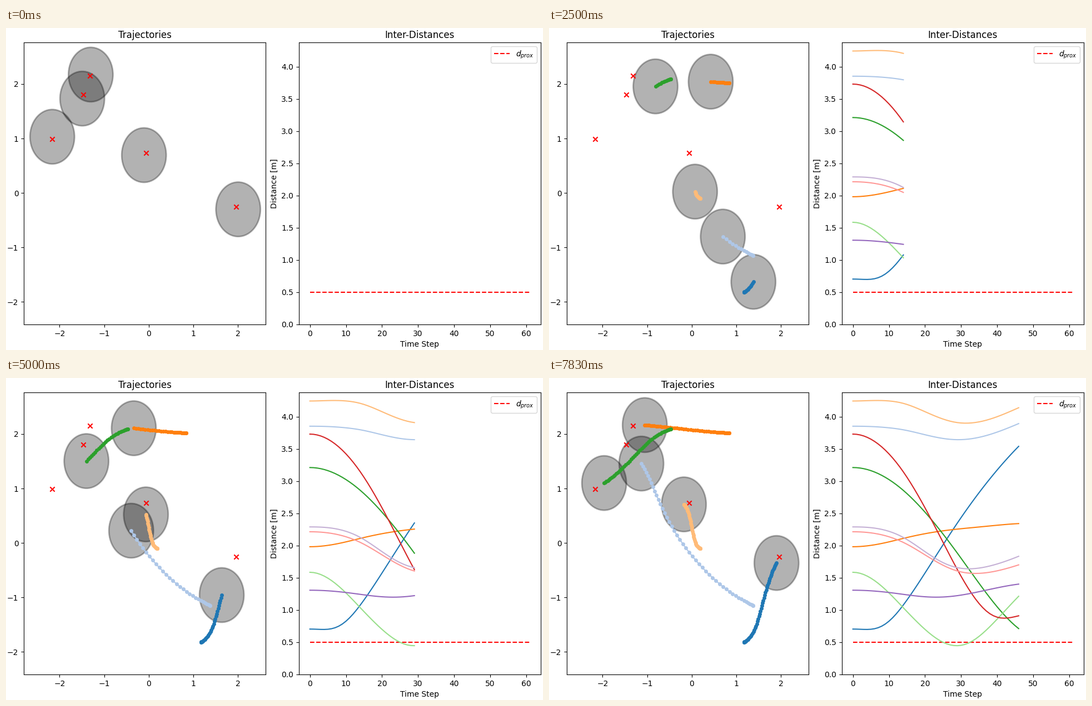
Write a matplotlib script that moves like this. It is 966 px wide and 580 px high and loops after 8000 ms.

```python
from itertools import combinations

import matplotlib.pyplot as plt
import numpy as np
from matplotlib.animation import FuncAnimation

W, H, DPI = 966, 580, 100
LOOP, TICK = 8000, 50
SHOWN = 48  # time steps shown per loop
LAST = 61
RADIUS = PROX = 0.5

# Each agent's start, three waypoints and end, reached at these time steps.
KNOTS = np.array([0, 14, 29, 46, LAST])
PATHS = [
    [(1.174, -1.820), (1.386, -1.631), (1.640, -0.956), (1.905, -0.367), (2.010, -0.300)],
    [(1.380, -1.147), (0.699, -0.800), (-0.393, 0.226), (-1.130, 1.458), (-1.492, 1.733)],
    [(0.838, 2.019), (0.427, 2.044), (-0.335, 2.107), (-1.054, 2.165), (-1.302, 2.174)],
    [(0.190, -0.099), (0.075, 0.025), (-0.062, 0.525), (-0.175, 0.709), (-0.106, 0.695)],
    [(-0.467, 2.095), (-0.813, 1.957), (-1.399, 1.504), (-1.967, 1.101), (-2.166, 1.033)],
]
GOALS = [(1.97, -0.25), (-1.47, 1.804), (-1.32, 2.151), (-0.06, 0.734), (-2.17, 0.989)]


def spline(t, p, ts):
    """Cubic spline through p at times t, at rest at both ends."""
    n = len(t)
    h = np.diff(t)[:, None].astype(float)
    rise = np.diff(p, axis=0) / h
    a, b = np.eye(n), np.zeros_like(p)
    for i in range(1, n - 1):
        h0, h1 = h[i - 1, 0], h[i, 0]
        a[i, i - 1:i + 2] = h1, 2 * (h0 + h1), h0
        b[i] = 3 * (h1 * rise[i - 1] + h0 * rise[i])
    v = np.linalg.solve(a, b)
    k = np.clip(np.searchsorted(t, ts, side="right") - 1, 0, n - 2)
    s = (ts - t[k])[:, None] / h[k]
    return (p[k] * (1 + 2 * s) * (1 - s) ** 2
            + p[k + 1] * s ** 2 * (3 - 2 * s)
            + h[k] * s * (1 - s) * (v[k] * (1 - s) - v[k + 1] * s))


def add_axes(left, title):
    width, top, bottom = 435, 25.9, 533.9
    ax = fig.add_axes([left / W, 1 - bottom / H, width / W, (bottom - top) / H])
    ax.set_title(title)
    return ax


steps = np.arange(LAST + 1)
tracks = [spline(KNOTS, np.array(p), steps) for p in PATHS]
gaps = [np.linalg.norm(p - q, axis=1) for p, q in combinations(tracks, 2)]
colors = plt.get_cmap("tab20").colors

fig = plt.figure(figsize=(W / DPI, H / DPI), dpi=DPI)

ax = add_axes(32.1, "Trajectories")
ax.set(xlim=(-2.804, 2.627), ylim=(-2.413, 2.765))
discs = [ax.add_patch(plt.Circle(p[-1], RADIUS, color="black", alpha=0.3, lw=2))
         for p in tracks]
ax.scatter(*zip(*GOALS), marker="x", color="red")
trails = [ax.plot([], [], "o-", ms=4, color=c)[0] for c in colors[:len(tracks)]]

ax = add_axes(526.9, "Inter-Distances")
ax.set(xlim=(-3.05, 64.05), ylim=(0, 4.379),
       xlabel="Time Step", ylabel="Distance [m]")
ax.plot([0, LAST], [PROX, PROX], "r--", label="$d_{prox}$")
curves = [ax.plot([], [], color=c)[0] for c in colors[:len(gaps)]]
ax.legend(loc="upper right")


def update(frame):
    # Show the latest step that begins within this tick.
    count = ((frame + 1) * TICK - 1) * SHOWN // LOOP
    # With no history yet, the discs wait at their final poses.
    for disc, trail, p in zip(discs, trails, tracks):
        disc.center = p[count - 1]
        trail.set_data(p[:count].T)
    for curve, gap in zip(curves, gaps):
        curve.set_data(steps[:count], gap[:count])
    return [*discs, *trails, *curves]


anim = FuncAnimation(fig, update, frames=LOOP // TICK, interval=TICK,
                     repeat=True, repeat_delay=0)
plt.show()
```
